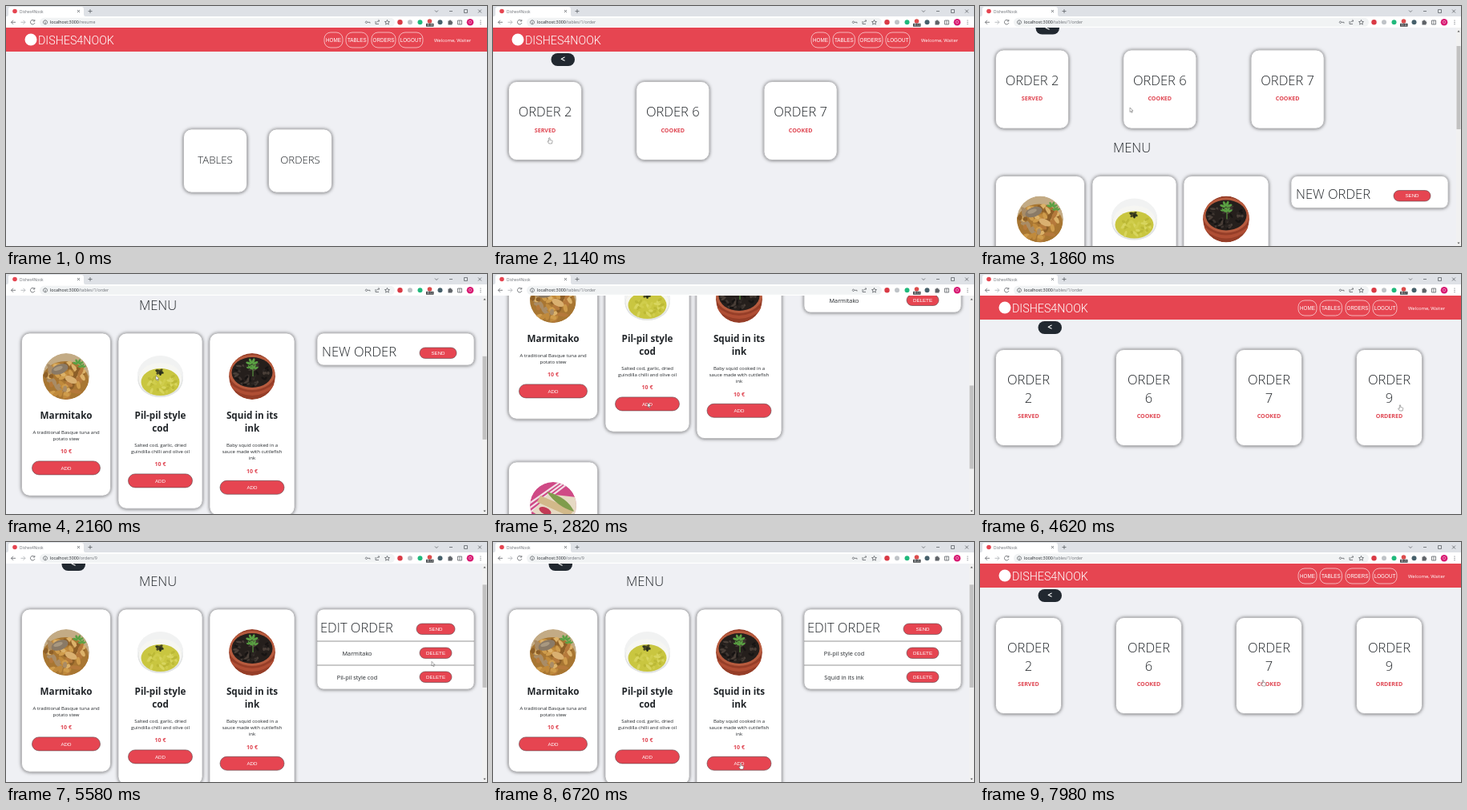
An HTML page that plays this animation: 600 by 300 pixels, repeating every 8 s.

```html
<!DOCTYPE html>
<html lang="en">
<head>
<meta charset="utf-8">
<title>Dishes4Nook</title>
<style>
  html, body { margin: 0; width: 100%; height: 100%; overflow: hidden; background: #eff0f4; }
  svg { display: block; width: 600px; height: 300px; }
  text { font-family: "Open Sans", "Noto Sans", sans-serif; fill: #212529; white-space: pre; }
  .mid { text-anchor: middle; }
  .light { font-weight: 300; }
  .bold { font-weight: 700; }
  .red { fill: #df4450; }
  .white { fill: #fff; }
  .arial { font-family: "Liberation Sans", Arial, sans-serif; }
  .thin { font-family: Roboto, sans-serif; font-weight: 300; }
  .grey { fill: #6b6f75; }
  .line { fill: none; stroke: #5f6368; stroke-width: .8; }
  .card { fill: #fff; stroke: #a2a2a4; stroke-width: .6; filter: url(#shadow); }
</style>
</head>
<body>
<svg viewBox="0 0 600 300">
  <defs>
    <filter id="shadow" x="-15%" y="-15%" width="130%" height="130%">
      <feDropShadow dx="0" dy="0.3" stdDeviation="2.3" flood-color="#000" flood-opacity=".6"/>
    </filter>
    <clipPath id="view"><rect y="27" width="600" height="273"/></clipPath>
    <clipPath id="dish"><circle r="29"/></clipPath>
  </defs>
  <rect width="600" height="300" fill="#eff0f4"/>
  <g clip-path="url(#view)"><g id="page"></g></g>
  <g id="bar">
    <rect x="594" y="27" width="6" height="273" fill="#f1f1f1"/>
    <path d="M595.5 32.5l1.5-2 1.5 2zM595.5 295.5l1.5 2 1.5-2z" fill="#555"/>
    <rect id="thumb" x="594.5" width="5" fill="#c1c1c1"/>
  </g>
  <g id="chrome"></g>
  <g id="cursor" stroke="#555" stroke-width=".5" stroke-linejoin="round" fill="#fff">
    <path id="arrow" d="M0 0V5.6L1.3 4.4 2.2 6.4 3.1 6 2.2 4.1H4z"/>
    <path id="hand" d="M-.7 0Q0-1 .7 0V2.5L3.3 3.1Q3.9 3.3 3.7 4.3L3 7H-.5L-2.4 4.2Q-2.2 3.3-.7 4.2z"/>
  </g>
</svg>
<script>
const LOOP = 8000, RED = '#e64551', HEAD = 16.5;
const $ = id => document.getElementById(id);

const text = (x, y, str, size, cls = '') =>
  `<text x="${x}" y="${y}" font-size="${size}" class="${cls}">${str}</text>`;
const mid = (x, y, str, size, cls = '') => text(x, y, str, size, 'mid ' + cls);
const box = (x, y, w, h, r, attrs) =>
  `<rect x="${x}" y="${y}" width="${w}" height="${h}" rx="${r}" ${attrs}/>`;
const dot = (x, y, r, fill) => `<circle cx="${x}" cy="${y}" r="${r}" fill="${fill}"/>`;
const oval = (x, y, rx, ry, fill, turn = 0) =>
  `<ellipse rx="${rx}" ry="${ry}" fill="${fill}" transform="translate(${x} ${y}) rotate(${turn})"/>`;
const path = (d, attrs = 'class="line"') => `<path d="${d}" ${attrs}/>`;
const card = (x, y, w, h, r = 10) => box(x, y, w, h, r, 'class="card"');
const button = (x, y, w, h, label) =>
  box(x, y, w, h, h / 2, `fill="${RED}" stroke="#5b4146" stroke-width=".6"`) +
  mid(x + w / 2, y + h / 2 + 2.2, label, 6.2, 'arial white');

function random(seed) {
  return () => (seed = seed * 16807 % 2147483647) / 2147483647;
}

// Specks scattered inside an ellipse.
function specks(count, seed, colors, size, cy, rx, ry) {
  const next = random(seed);
  return Array.from({ length: count }, (_, i) => {
    const a = next() * 6.28, d = Math.sqrt(next());
    return oval(Math.cos(a) * d * rx, cy + Math.sin(a) * d * ry, size * (.6 + next()), size * .55,
      colors[i % colors.length], next() * 180);
  }).join('');
}

const leaves = (x, y, s) => [-70, -25, 20, 65].map(a =>
  oval(x + s * Math.sin(a / 57.3), y - s * Math.cos(a / 57.3), s * .35, s * .8, '#5aa043', a)).join('');

const dishes = {
  stew: () => dot(0, 0, 29, '#c3ab85') + oval(-1, 5, 29, 24, '#a87632') +
    specks(70, 71, ['#cf9c4c', '#8d5f28', '#dcb26a', '#b5793b', '#a98c66', '#c08a3c'], 4.5, 4, 27, 22) +
    oval(-8, -9, 11, 6, '#8a7a66', -20) + oval(-10, -10, 6, 2.5, '#a89880', -20) +
    oval(6, 4, 8, 4, '#dab070', 25) + leaves(15, -15, 4) + leaves(20, -11, 3),
  cod: () => oval(0, 0, 29, 26, '#f1f2f2') + oval(0, 5, 28, 21, '#e2e4e4') + oval(0, 3, 27, 20, '#f6f6f2') +
    oval(0, 7, 24, 17, '#c9c640') +
    specks(30, 29, ['#d8d55e', '#bcb936', '#d0cd4c'], 3, 8, 20, 13) +
    oval(-1, -6, 5.5, 2.2, '#33391f', 20) + oval(-1, -6, 5, 1.8, '#4c4a22', -40) + oval(0, -4, 1.5, 3, '#2b2f1a'),
  squid: () => dot(0, 0, 29, '#963e28') + oval(0, -5, 29, 22, '#b75b3e') + oval(0, -5, 25.5, 19, '#251f1c') +
    specks(50, 13, ['#3f3631', '#171413', '#4b4039', '#2c2623'], 2.4, -4, 22, 16) +
    path('M-29 8Q0 32 29 8V12Q0 36-29 12z', 'fill="#b04e34"') +
    path('M1 0V-15', 'stroke="#63a947" stroke-width="1"') + leaves(0, -15, 4.5) + leaves(2, -9, 3.5) + leaves(-3, -10, 2.5),
  pintxo: () => dot(0, 0, 29, '#cf4a86') +
    path('M-30-2L10-30M-30 4L16-30M-30 10L22-30', 'stroke="#f1dfe6" stroke-width="2.2"') +
    path('M-26 8L-6-14 29-10V14L-8 20z', 'fill="#e6d9c4"') +
    path('M-16-12L26 6 20 14-20-4z', 'fill="#d2b98a"') + path('M-8-17Q18-10 26 8 5 2-8-17z', 'fill="#7f9c4c"') +
    oval(-10, 7, 8, 4, '#c23a55', 25) + oval(8, 20, 13, 5, '#eab1c6', -15)
};
const picture = (x, y, kind) =>
  `<g transform="translate(${x} ${y})"><g clip-path="url(#dish)">${dishes[kind]()}</g></g>`;

const meals = [
  { x: 19.5, w: 111, pad: 13, kind: 'stew', name: ['Marmitako'],
    info: ['A traditional Basque tuna and', 'potato stew'] },
  { x: 140, w: 105, pad: 12.5, kind: 'cod', name: ['Pil-pil style', 'cod'],
    info: ['Salted cod, garlic, dried', 'guindilla chilli and olive oil'] },
  { x: 254, w: 106, pad: 13, kind: 'squid', name: ['Squid in its', 'ink'],
    info: ['Baby squid cooked in a', 'sauce made with cuttlefish', 'ink'] }
];
const [STEW, COD, SQUID] = ['Marmitako', 'Pil-pil style cod', 'Squid in its ink'];

function meal({ x, w, pad, kind, name, info }, top) {
  const cx = x + w / 2;
  const nameY = top + 107, infoY = nameY + 16 * (name.length - 1) + 18.5;
  const price = infoY + 8.4 * (info.length - 1) + 16.5, add = price + 9.5;
  return card(x, top, w, add + 43.3 - top) + picture(cx, top + 54, kind) +
    name.map((s, i) => mid(cx, nameY + 16 * i, s, 11.7, 'bold')).join('') +
    info.map((s, i) => mid(cx, infoY + 8.4 * i, s, 6)).join('') +
    mid(cx, price, '10 €', 7, 'bold red') + button(x + pad, add, w - 2 * pad, 17, 'ADD');
}

function menu(top, title, rows) {
  const shift = rows.length ? 0 : 2;
  return mid(189.5, top - 29.5, 'MENU', HEAD, 'light') +
    meals.map(m => meal(m, top)).join('') +
    card(19.5, top + 257, 111, 180) + picture(75, top + 311, 'pintxo') +
    card(388, top, 196, 40 + 30 * rows.length, 8) +
    text(392 + shift, top + 28.5, title, HEAD, 'light') +
    button(512 + 2 * shift, top + 18, 48 - shift, 13.5, 'SEND') +
    rows.map((s, i) => {
      const y = top + 40 + 30 * i;
      return path(`M388 ${y}H584`, 'stroke="#888" stroke-width=".9"') +
        mid(438, y + 17.5, s, 7.3) + button(516, y + 8, 40, 13.5, 'DELETE');
    }).join('');
}

const header = () => box(0, 27, 600, 30, 0, `fill="${RED}"`) + dot(31, 42, 7.5, '#fff') +
  text(40, 48, 'DISHES4NOOK', 14.3, 'thin white') +
  [[397, 23, 'HOME'], [424, 27.5, 'TABLES'], [456, 30, 'ORDERS'], [490, 30, 'LOGOUT']].map(([x, w, s]) =>
    box(x, 33, w, 19, 8, 'fill="none" stroke="#fff" stroke-width=".6"') +
    mid(x + w / 2, 44.7, s, 6.3, 'arial white')).join('') +
  text(534, 44.5, 'Welcome, Waiter', 5.9, 'white');
const back = (x = 72.5) =>
  box(x, 59, 29.5, 16, 8, 'fill="#212830"') + mid(x + 14.5, 70.3, '&lt;', 10, 'bold white');

const home = () => header() + [[221.5, 'TABLES'], [327.5, 'ORDERS']].map(([x, s]) =>
  card(x, 154, 79, 79) + mid(x + 39.5, 197, s, 13.2, 'light')).join('');
const tables = () => header() + back() + [1, 2, 3, 4].map((n, i) => {
  const x = 19.5 + 150 * i;
  return card(x, 94.5, 73, 104) + mid(x + 36.5, 138, 'TABLE', HEAD, 'light') + mid(x + 36.5, 161, n, HEAD, 'light');
}).join('');
const orders = [[2, 'SERVED'], [6, 'COOKED'], [7, 'COOKED'], [9, 'ORDERED']];
const threeOrders = backX => header() + back(backX) + orders.slice(0, 3).map(([n, state], i) => {
  const x = 19.5 + 159.3 * i;
  return card(x, 94.5, 91, 98) + mid(x + 45.5, 138, 'ORDER ' + n, HEAD, 'light') +
    mid(x + 45.5, 157.5, state, 7.1, 'bold red');
}).join('');
const fourOrders = () => header() + back() + orders.map(([n, state], i) => {
  const x = 19.5 + 150 * i, cx = x + 41;
  return card(x, 94.5, 82, 120) + mid(cx, 138, 'ORDER', HEAD, 'light') +
    mid(cx, 161, n, HEAD, 'light') + mid(cx, 180, state, 7.1, 'bold red');
}).join('');
const NARROW_BACK = 69.5;
const ordering = (...rows) => () => threeOrders(NARROW_BACK) + menu(252, 'NEW ORDER', rows);
const editing = (...rows) => () => header() + back(NARROW_BACK) + menu(123, 'EDIT ORDER', rows);

// start, path, page, height of the scrolled content (0: no scrollbar)
const scenes = [
  [0, 'resume', home, 0],
  [660, 'tables', tables, 0],
  [1140, 'tables/1/order', () => threeOrders(), 0],
  [1440, 'tables/1/order', ordering(), 677],
  [2460, 'tables/1/order', ordering(STEW), 677],
  [2880, 'tables/1/order', ordering(STEW, COD), 677],
  [4200, 'tables/1/order', fourOrders, 0],
  [5040, 'orders/9', editing(STEW, COD), 548],
  [5940, 'orders/9', editing(COD), 548],
  [6600, 'orders/9', editing(COD, SQUID), 548],
  [7620, 'tables/1/order', fourOrders, 0]
];
const scrolls = [[0, 0], [1740, 0], [1860, 39], [2200, 196], [2280, 196], [2420, 274], [3180, 274],
  [3400, 196], [4199, 196], [4200, 0], [5340, 0], [5520, 39], [6990, 39], [7200, 0]];
const moves = [[60, 300, 270], [540, 262, 202], [840, 240, 190], [1080, 70, 165], [1440, 75, 165],
  [1740, 187, 127], [2200, 187, 127], [2400, 75, 146], [2640, 75, 146], [2800, 193, 161], [3400, 193, 161],
  [3840, 536, 81], [4200, 536, 81], [4560, 524, 164], [5280, 524, 164], [5820, 536, 139],
  [6120, 536, 139], [6540, 309, 277], [6900, 309, 277], [7260, 536, 149], [7620, 536, 149], [7920, 353, 173]];
const pointing = [[480, 700], [1020, 1180], [2380, 2680], [3780, 5100], [5760, 6180], [6500, 6920], [7200, 8000]];

function sample(table, t, ease = p => p) {
  const next = table.findIndex(row => row[0] > t);
  if (next < 1) return (next ? table.at(-1) : table[0]).slice(1);
  const a = table[next - 1], b = table[next], p = ease((t - a[0]) / (b[0] - a[0]));
  return a.slice(1).map((v, i) => v + (b[i + 1] - v) * p);
}

$('chrome').innerHTML =
  box(0, 0, 600, 13.5, 0, 'fill="#dee1e6"') + box(0, 13, 600, 14, 0, 'fill="#fff"') +
  path('M1 13Q3 13 3 10V4Q3 1 6 1H94Q97 1 97 4V10Q97 13 99 13z', 'fill="#fff"') +
  dot(11, 6.5, 2.8, RED) + text(17, 8.5, 'Dishes4Nook', 4.8, 'grey') +
  path('M89 5l3 3M92 5l-3 3M102.5 6.5h5M105 4v5M535 5.5l2 2 2-2M553 6.5h4M571.5 4.5h4v4h-4zM589 4.5l4 4M593 4.5l-4 4') +
  path('M12 20.3H6.5M9 17.8l-2.5 2.5 2.5 2.5M35.3 18.3a2.8 2.8 0 1 0 .6 2.8M35.8 17v2h-2') +
  path('M18.5 20.3H24M21.5 17.8l2.5 2.5-2.5 2.5', 'fill="none" stroke="#b5b8bc" stroke-width=".9"') +
  box(42, 14.8, 443, 11, 5.5, 'fill="#f1f3f4"') +
  path('M49 17.8a2.5 2.5 0 1 0 .01 0M49 20v2M49 18.8v.5M451 20.3h3v1.3M461 19v3.5h4M462.5 20.5q.5-2 3-2M464.5 17.2l1.5 1.3-1.5 1.3') +
  path('M475.5 17.4l.9 2 2.1.2-1.6 1.4.5 2.1-1.9-1.1-1.9 1.1.5-2.1-1.6-1.4 2.1-.2z') +
  path('M449.5 19.1a1.2 1.2 0 1 0 .01 0') +
  '<text id="url" x="55" y="22.3" font-size="5.3"></text>' +
  dot(491.5, 20.3, 3.2, '#d93a45') + dot(504, 20.3, 3, '#bfc3c7') + dot(516.5, 20.3, 3, '#20b97c') +
  dot(528.5, 19, 2.8, '#dc4c4c') + box(524, 21.8, 9.5, 4, .6, 'fill="#3c4043"') +
  '<text id="clock" class="mid white arial" x="528.7" y="24.9" font-size="3"></text>' +
  dot(541.5, 20.3, 3, '#46606b') +
  path('M551.5 18.5h1.5q1-2.5 2 0h1.5v1.5q2 .8 0 2v1.500h-5z', 'fill="#5f6368"') +
  path('M563.5 18h5v5h-5zM566 18v5') + dot(579, 20.3, 4.3, '#d81b73') + mid(579, 22, 'O', 4.6, 'white') +
  [18, 20.3, 22.6].map(y => dot(592, y, .6, '#5f6368')).join('');

let shown;
function render(t) {
  const scene = scenes.findLast(s => s[0] <= t), [, url, page, height] = scene;
  if (scene !== shown) {
    $('page').innerHTML = page();
    $('url').innerHTML = `localhost:3000<tspan class="grey">/${url}</tspan>`;
    $('bar').style.display = height ? '' : 'none';
    shown = scene;
  }
  const [scroll] = sample(scrolls, t);
  $('page').setAttribute('transform', `translate(0 ${-scroll})`);
  if (height) {
    $('thumb').setAttribute('y', 35 + scroll * 258 / height);
    $('thumb').setAttribute('height', 273 * 258 / height);
  }
  $('clock').textContent = '00:' + String(8 + Math.floor(t / 500)).padStart(2, '0');

  const [x, y] = sample(moves, t, p => p * p * (3 - 2 * p));
  const hand = pointing.some(([from, to]) => t >= from && t < to);
  $('cursor').setAttribute('transform', `translate(${x} ${y})`);
  $('cursor').style.display = t < 60 ? 'none' : '';
  $('hand').style.display = hand ? '' : 'none';
  $('arrow').style.display = hand ? 'none' : '';
}

const start = performance.now();
function tick() {
  render((performance.now() - start) % LOOP);
  requestAnimationFrame(tick);
}
tick();
</script>
</body>
</html>
```
